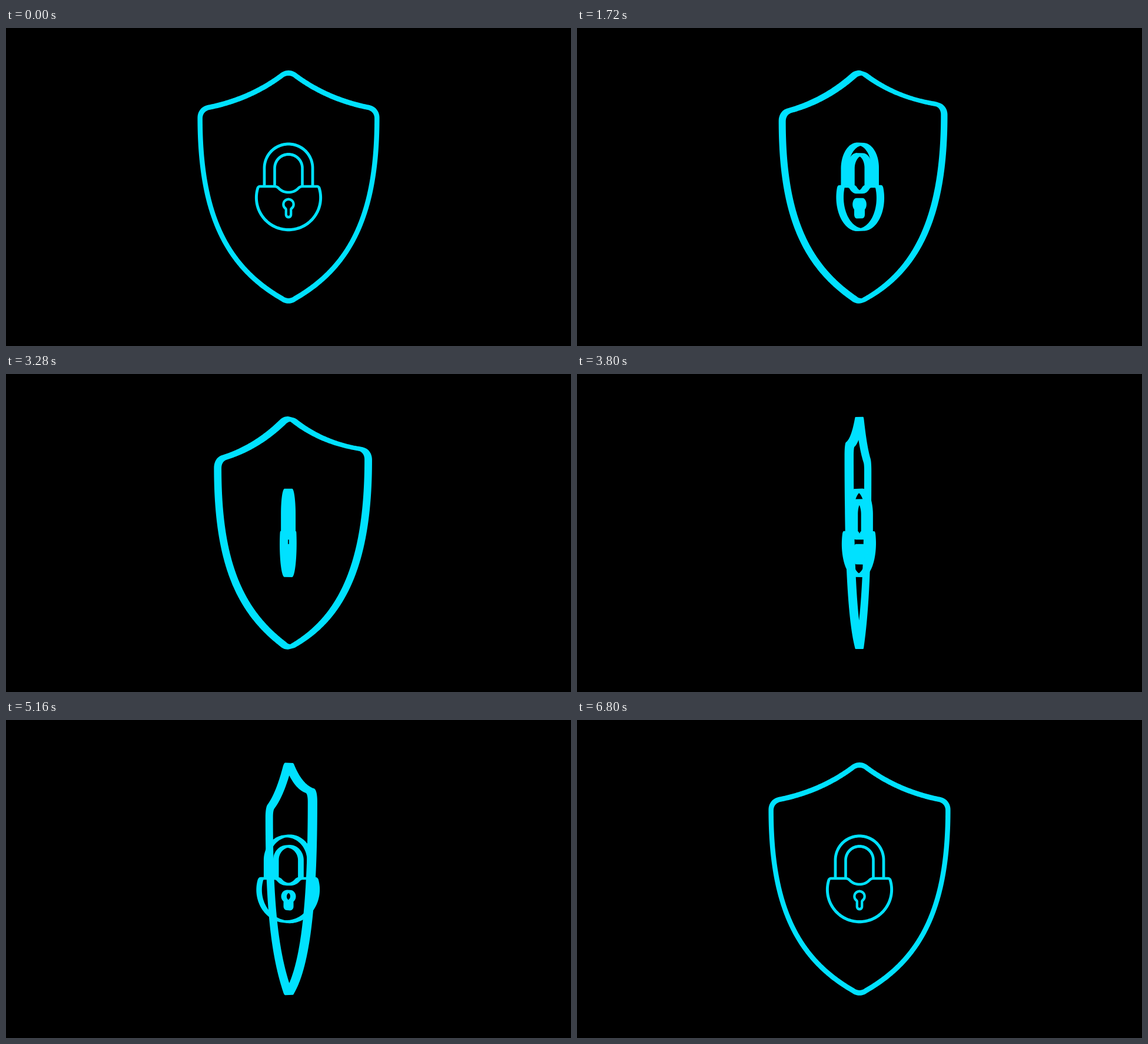
These frames come from a looping animation (960 px wide and 540 px high, 7000 ms). An HTML page with a canvas:

```html
<!DOCTYPE html>
<html lang="en">
<head>
<meta charset="utf-8">
<title>Shield and padlock</title>
<style>
  html, body { margin: 0; width: 100%; height: 100%; overflow: hidden; background: #000; }
  canvas { display: block; }
</style>
</head>
<body>
<canvas id="stage" width="960" height="540"></canvas>
<script>
const ctx = document.getElementById('stage').getContext('2d');
const LOOP = 7000;
const CAMERA = 1333;   // distance from the eye to the turning axis
const DEPTH = 6.5;     // half thickness of the extrusion
const STEP = 2;

// Each outline is its right half, measured from the stage centre, then mirrored.
function sampleHalf(d) {
  const path = document.createElementNS('http://www.w3.org/2000/svg', 'path');
  path.setAttribute('d', d);
  const length = path.getTotalLength();
  const n = Math.ceil(length / STEP);
  return Array.from({ length: n + 1 }, (_, i) => {
    const p = path.getPointAtLength(length * i / n);
    return [p.x, p.y];
  });
}

// Turns a centre line into its two edges.
function ribbon(d, width, closed) {
  const half = sampleHalf(d);
  const mirror = half.map(([x, y]) => [-x, y]).reverse();
  const line = closed
    ? half.concat(mirror.slice(1, -1))
    : mirror.concat(half.slice(1));
  const n = line.length;
  const at = i => closed ? line[(i + n) % n] : line[Math.min(n - 1, Math.max(0, i))];
  const edge = side => line.map(([x, y], i) => {
    const a = at(i - 1), b = at(i + 1);
    const dx = b[0] - a[0], dy = b[1] - a[1];
    const k = side * width / 2 / Math.hypot(dx, dy);
    return [x + dy * k, y - dx * k];
  });
  return { outer: edge(1), inner: edge(-1), closed };
}

const shield = [
  ribbon('M0 -193.5Q6.5 -193.5 12 -189Q66 -149 136 -135C145 -133 150.3 -126 150.3 -117' +
         'C150.3 42 108 134 11 189.5Q6 193.3 0 193.3', 7, true)
];
const padlock = [
  ribbon('M0 -73A41 41 0 0 1 41 -32V-1', 4.4, false),
  ribbon('M0 -55.5A23.5 23.5 0 0 1 23.5 -32V-1', 4.4, false),
  ribbon('M0 9Q10 9 16.5 2.3Q19.5 -1 23 -1H48.5Q51.5 -1 52.2 2A54.6 54.6 0 0 1 0 72.6', 4.4, true),
  ribbon('M0 20.8A8.7 8.7 0 0 1 4.2 37.1V47A4.2 4.2 0 0 1 0 51.2', 4.2, true)
];

// Adds a quad, always wound the same way so that overlaps never cancel.
function quad(a, b, c, d) {
  const area = (c[0] - a[0]) * (d[1] - b[1]) - (d[0] - b[0]) * (c[1] - a[1]);
  const [p, q] = area > 0 ? [b, d] : [d, b];
  ctx.moveTo(a[0], a[1]);
  ctx.lineTo(p[0], p[1]);
  ctx.lineTo(c[0], c[1]);
  ctx.lineTo(q[0], q[1]);
  ctx.closePath();
}

// Fills the silhouette of the extruded ribbons: two faces and two walls each.
function drawSolid(ribbons, degrees) {
  const angle = degrees * Math.PI / 180;
  const c = Math.cos(angle), s = Math.sin(angle);
  const project = z => ([x, y]) => {
    const scale = CAMERA / (CAMERA + x * s - z * c);
    return [(x * c + z * s) * scale, y * scale];
  };
  const front = project(DEPTH), back = project(-DEPTH);
  for (const { outer, inner, closed } of ribbons) {
    const rails = [outer.map(front), inner.map(front), inner.map(back), outer.map(back)];
    const n = outer.length;
    ctx.beginPath();
    for (let i = 0; i < (closed ? n : n - 1); i++) {
      const j = (i + 1) % n;
      rails.forEach((rail, k) => {
        const next = rails[(k + 1) % 4];
        quad(rail[i], rail[j], next[j], next[i]);
      });
    }
    ctx.fill();
  }
}

// Motion is built at 30 steps a second and shown at 25.
function stepAt(ms) {
  const shown = Math.floor((ms + 0.5) / 40);
  return Math.min(180, Math.floor(shown * 6 / 5));
}

let last = -1;
function draw(ms) {
  const step = stepAt(ms);
  if (step === last) return;
  last = step;
  ctx.setTransform(1, 0, 0, 1, 0, 0);
  ctx.fillStyle = '#000';
  ctx.fillRect(0, 0, 960, 540);
  ctx.translate(480, 270);
  ctx.fillStyle = '#00e1ff';
  drawSolid(shield, -4 * step);
  drawSolid(padlock, -step);
}

const start = performance.now();
function tick() {
  draw((performance.now() - start) % LOOP);
  requestAnimationFrame(tick);
}
tick();
</script>
</body>
</html>
```
